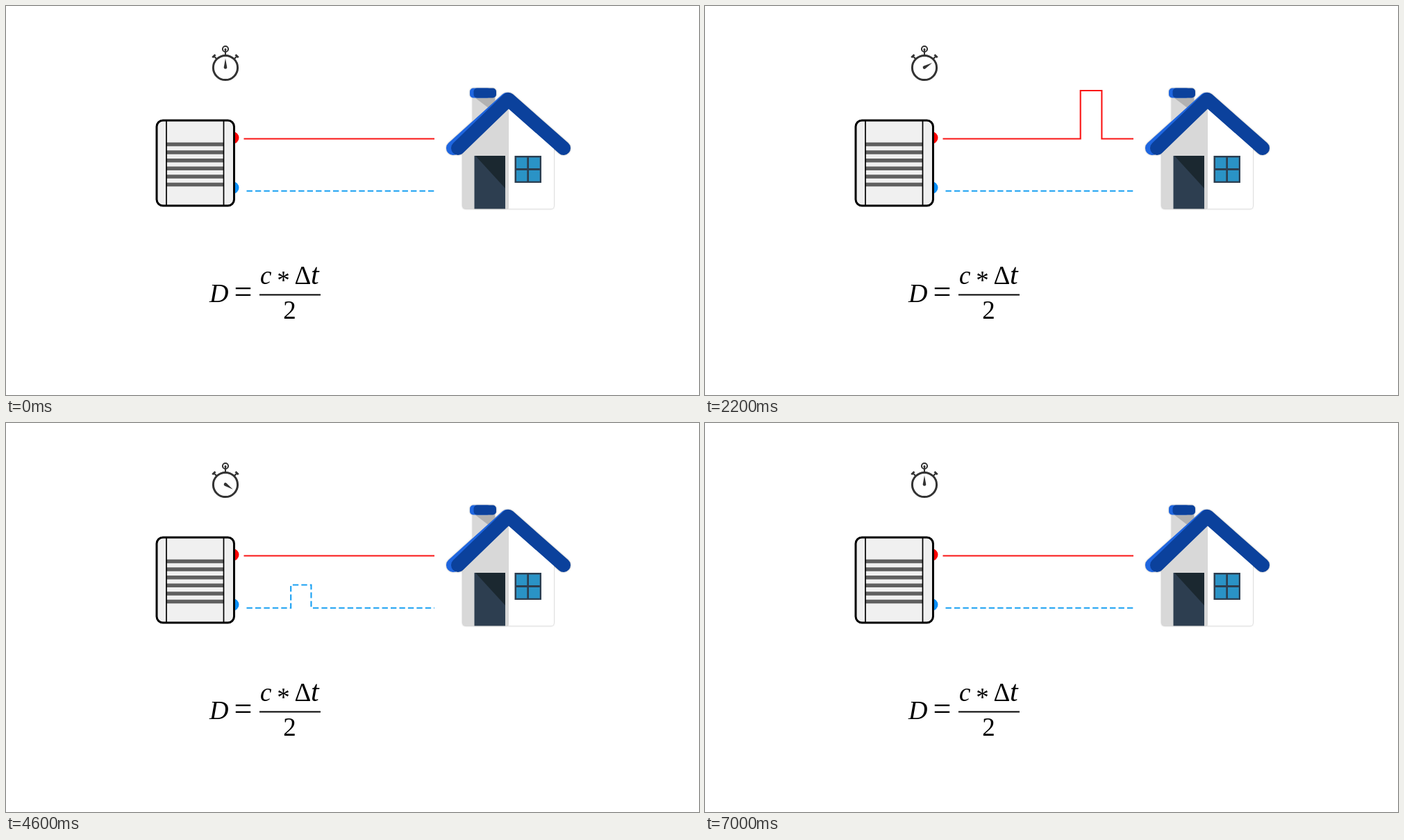
An HTML page that plays this animation: 998x561 px, repeating every 8 s.

```html
<!DOCTYPE html>
<html lang="en">
<head>
<meta charset="utf-8">
<title>Time of flight</title>
<style>
  html, body { margin: 0; width: 100%; height: 100%; overflow: hidden; background: #fff; }
  svg { display: block; width: 998px; height: 561px; }
  text { font-family: "Liberation Serif", "Times New Roman", serif; }
  .i { font-style: italic; }
  .mid { text-anchor: middle; }
  .formula { font-size: 37px; }
  .value { font-size: 44px; fill: #404040; }
  .house { filter: drop-shadow(0 0 1px rgba(0, 0, 0, .35)); }
</style>
</head>
<body>
<svg viewBox="0 0 998 561">
  <defs>
    <clipPath id="wipe"><rect id="wipeBox" x="480" y="385" width="0" height="60"/></clipPath>
  </defs>
  <rect width="998" height="561" fill="#fff"/>

  <g fill="none" stroke="#333">
    <circle cx="316" cy="89" r="17.6" stroke-width="3"/>
    <circle cx="316" cy="62" r="4.1" stroke-width="2"/>
    <path d="M316 62V72" stroke-width="2.2"/>
    <path d="M303.5 76.5L299.5 72.5M328.500 76.5L332.500 72.5" stroke-width="2.2"/>
    <path d="M297.300 74.300L301.500 70.300M334.700 74.300L330.500 70.300" stroke-width="2.8"/>
    <circle cx="316" cy="62.5" r="1.5" fill="#333" stroke="none"/>
  </g>
  <path id="hand" d="M316 75.500L318.300 88.500A2.300 2.300 0 0 1 313.700 88.500Z" fill="#333"/>

  <circle cx="326.500" cy="190" r="9" fill="#f00"/>
  <circle cx="326.500" cy="262" r="9" fill="#0a90fa"/>
  <rect x="217" y="165" width="111.500" height="123" rx="9" fill="#f0f0f0" stroke="#000" stroke-width="3"/>
  <path id="bars" stroke="#606060" stroke-width="5.5"/>
  <path d="M231 165V288M313.500 165V288" stroke="#000" stroke-width="1.7"/>

  <path id="sent" fill="none" stroke="#fa1414" stroke-width="2.100"/>
  <path id="echo" fill="none" stroke="#18a0f2" stroke-width="2.100" stroke-dasharray="8.350 4.100"/>

  <g class="house">
    <path d="M672 130H704V172H672Z" fill="#d8d8d8"/>
    <path d="M675 132H704V154Z" fill="#b2b2b2"/>
    <path d="M723.500 146L789 205V288Q789 292.500 784.500 292.500H723.500Z" fill="#fff"/>
    <path d="M723.500 146L657.500 208V288Q657.500 292.500 662 292.500H723.500Z" fill="#d8d8d8"/>
    <path d="M674.500 216H719V292.500H674.500Z" fill="#2d3e50"/>
    <path d="M676 216H719V263Z" fill="#1b2830"/>
    <rect x="668" y="118.500" width="30" height="14" rx="5" fill="#1f66e0"/>
    <rect x="673.500" y="118.500" width="32.500" height="14" rx="5" fill="#0b419c"/>
    <g fill="none" stroke-width="20" stroke-linecap="round" stroke-linejoin="round">
      <path d="M644 205L721.500 134.800" stroke="#1f66e0"/>
      <path d="M651 205L723.500 134.800L803 205" stroke="#0b419c"/>
    </g>
    <rect x="732.500" y="216" width="38.500" height="39" fill="#2d3e50"/>
    <path d="M735 218.500H750.300V234H735ZM753 218.500H768.700V234H753ZM735 237H750.300V252.700H735ZM753 237H768.700V252.700H753Z" fill="#2a93c6"/>
  </g>

  <g class="formula">
    <text class="i" x="293" y="427" style="font-size:38px">D</text>
    <text class="mid" x="341.500" y="427" style="font-size:46px">=</text>
    <text class="i" x="366" y="401">c</text>
    <text class="mid" x="399.500" y="407.500">*</text>
    <text class="mid" x="427.500" y="401">Δ</text>
    <text class="i" x="439" y="401" style="font-size:42px">t</text>
    <path d="M365 416.500H453" stroke="#000" stroke-width="2.200"/>
    <text class="mid" x="408.500" y="451">2</text>
  </g>

  <g id="reading">
    <g class="value">
      <text class="mid" x="354.500" y="95">Δ</text>
      <text class="i" x="367" y="95" style="font-size:48px">t</text>
      <text class="mid" x="409" y="95" style="font-size:52px">=</text>
      <text x="437" y="95">150</text>
      <text class="i" x="504" y="95" style="font-size:46px">ns</text>
    </g>
    <path d="M330.500 278V345M631.500 278V345" stroke="#333" stroke-width="1.200" stroke-dasharray="2 1.500"/>
  </g>

  <g class="value" clip-path="url(#wipe)">
    <text class="i" x="484" y="427">D</text>
    <text class="mid" x="544.500" y="427" style="font-size:52px">=</text>
    <text x="571" y="427">22.5</text>
    <text class="i" x="648" y="427">m</text>
  </g>
</svg>
<script>
const LOOP = 8000, STEP = 100, RESET = 7000;
const $ = id => document.getElementById(id);
const set = (id, name, value) => $(id).setAttribute(name, value);
const ramp = (t, from, to) => Math.min(1, Math.max(0, (t - from) / (to - from)));

// Right edge of each pulse: [time, x]
const sentKeys = [[300, 379], [900, 439], [1700, 518.5], [1800, 529.8], [2600, 613]];
const echoKeys = [[3000, 614], [3600, 548.8], [4500, 450], [4600, 439.5], [5200, 378]];

// Position between keys, or null when the pulse is not on its way
function along(keys, t) {
  for (let i = 1; i < keys.length; i++) {
    const [t0, x0] = keys[i - 1], [t1, x1] = keys[i];
    if (t >= t0 && t <= t1) return x0 + (x1 - x0) * ramp(t, t0, t1);
  }
  return null;
}

function signal(start, base, top, width, right) {
  const pulse = right === null ? "" : `H${right - width}V${top}H${right}V${base}`;
  return `M${start} ${base}${pulse}H617`;
}

function draw(time) {
  const now = Math.floor(time % LOOP / STEP) * STEP;
  const t = now < RESET ? now : 0;
  set("hand", "transform", `rotate(${t * 0.027} 316 88.5)`);
  set("sent", "d", signal(342.5, 191.5, 122, 30.7, along(sentKeys, t)));
  set("echo", "d", signal(346.5, 266.7, 233.5, 29.3, along(echoKeys, t)));
  set("reading", "opacity", ramp(t, 5400, 5700));
  set("wipeBox", "width", 205 * ramp(t, 6100, 6500));
}

let bars = "";
for (let i = 0; i < 6; i++) bars += `M231 ${199.5 + i * 11.6}H313.5`;
set("bars", "d", bars);

const begin = performance.now();
function tick() {
  draw(performance.now() - begin);
  requestAnimationFrame(tick);
}
tick();
</script>
</body>
</html>
```
